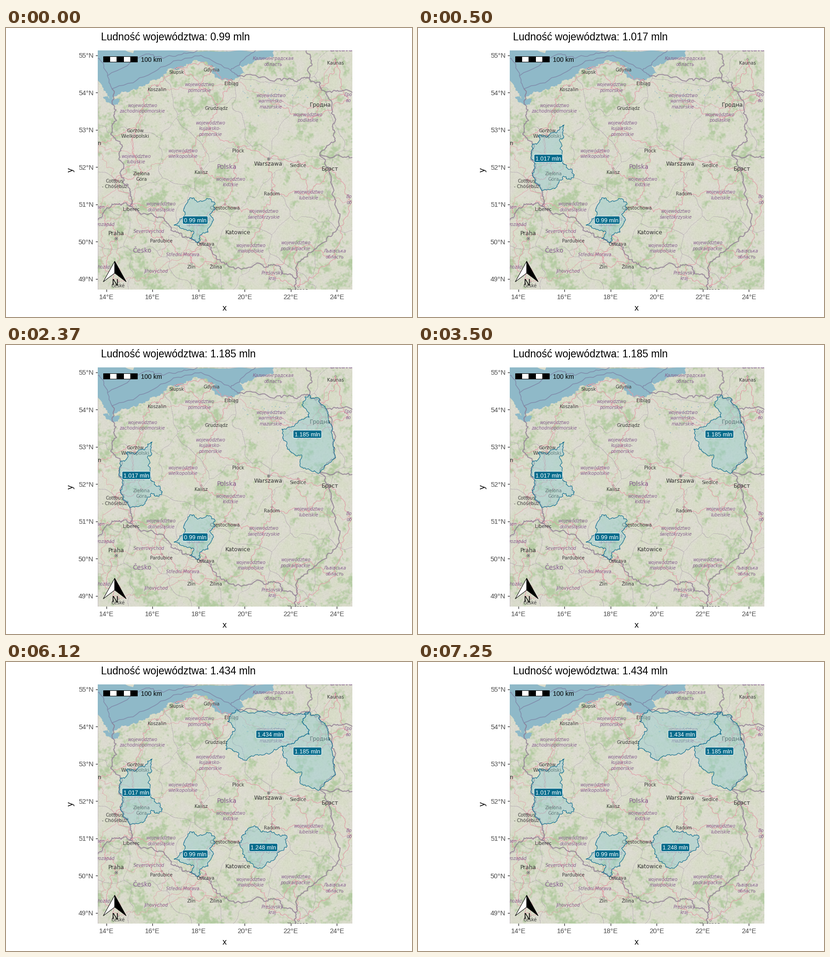
Write a matplotlib script that moves like this. It is 885x632 px and loops after 8000 ms.

```python
import numpy as np
import matplotlib.pyplot as plt
from matplotlib.animation import FuncAnimation
from matplotlib.collections import LineCollection
from matplotlib.patches import FancyBboxPatch, Polygon, Rectangle

W, H, DPI = 885, 632, 64
LEFT, RIGHT, TOP, BOTTOM = 200, 754.5, 49, 572
LOOP, STEP = 8000, 40
PT = 72 / DPI  # points per pixel
SEA_COLOR, PURPLE = "#8fb9c8", "#86608f"

fig = plt.figure(figsize=(W / DPI, H / DPI), dpi=DPI, facecolor="white")


def pixel_axes(x0, x1, y0, y1):
    ax = fig.add_axes([x0 / W, 1 - y1 / H, (x1 - x0) / W, (y1 - y0) / H])
    ax.set(xlim=(x0, x1), ylim=(y1, y0))
    ax.axis("off")
    return ax


page = pixel_axes(0, W, 0, H)
chart = pixel_axes(LEFT, RIGHT, TOP, BOTTOM)


def write(ax, x, y, text, size, color="black", font="Liberation Sans", **kw):
    return ax.text(x, y + 0.36 * size, text, size=size * PT, color=color,
                   family=font, va="baseline", clip_on=True, **kw)


def place(text, x, y, size=10, color="#3c3c3c", **kw):
    """Centre a map label of one or more lines on a point."""
    lines = text.split("\n")
    for i, line in enumerate(lines):
        write(chart, x, y + 12.6 * (i - (len(lines) - 1) / 2), line, size,
              color, "DejaVu Sans", ha="center", **kw)


def rough(points, depth=4, cap=3):
    """Jagged path; offsets depend on position, so shared borders agree."""
    p = np.array(points, float)
    for _ in range(depth):
        a, b = p[:-1], p[1:]
        mid = (a + b) / 2
        reach = np.minimum(np.hypot(*(b - a).T) * 0.26, cap)[:, None]
        key = mid @ np.array([12.9898, 78.233])
        mid += reach * np.c_[np.sin(key), np.cos(key * 1.7)]
        out = np.empty((len(a) + len(b) + 1, 2))
        out[::2], out[1::2] = p, mid
        p = out
    return p


def strokes(paths, color, width, **kw):
    chart.add_collection(LineCollection(paths, colors=color,
                                        linewidths=width * PT, **kw))


# Place names
TOWNS = [("Słupsk", 372, 96), ("Gdynia", 448, 91.5), ("Koszalin", 329, 134),
         ("Elbląg", 491, 121), ("Grudziądz", 459, 175), ("Płock", 506, 268),
         ("Gorzów\nWielkopolski", 282, 230.5), ("Siedlce", 636, 300),
         ("Kalisz", 425, 315), ("Zielona\nGóra", 295, 324.5),
         ("Cottbus\n- Chóśebuz", 237, 340.5), ("Radom", 579, 362.5),
         ("Liberec", 273, 396.5), ("Częstochowa", 477, 393.5),
         ("Pardubice", 339, 465), ("Ostrava", 435, 472.5),
         ("Zlín", 404, 522), ("Žilina", 458, 522), ("Kaunas", 718, 76.5),
         ("České", 244, 563), ("Ужгород", 637, 573)]
CITIES = [("Warszawa", 572, 297), ("Katowice", 505.5, 447),
          ("Praha", 240, 449), ("Гродна", 685, 168), ("Брэст", 706, 308),
          ("n", 204, 252)]
COUNTRIES = [("Polska", 481, 303.5), ("Česko", 297, 486),
             ("Lietuva", 731, 46)]
PROVINCES = [
    ("pomorskie", 421, 130), ("zachodniopomorskie", 297, 175.5),
    ("warmińsko-\nmazurskie", 577, 160), ("podlaskie", 658, 195.5),
    ("kujawsko-\npomorskie", 445, 220), ("wielkopolskie", 385, 274.5),
    ("lubuskie", 284, 286.5), ("łódzkie", 490, 336.5),
    ("dolnośląskie", 338, 391), ("opolskie", 413, 423.5),
    ("świętokrzyskie", 562, 407), ("lubelskie", 660, 365),
    ("małopolskie", 533, 481.5), ("podkarpackie", 631, 476)]
FOREIGN = [
    ("Калининградская\nобласть", 583, 73), ("Львівська\nобласть", 717, 494),
    ("Severovýchod", 312, 445), ("Střední Morava", 385, 496),
    ("Jihovýchod", 327, 531.5), ("Prešovský\nkraj", 581, 541.5),
    ("rozapád", 218, 430), ("hozáp", 214, 523), ("sen", 207, 392),
    ("Гро\nво", 746, 152), ("Во\nоб", 748, 375)]


def spots(places):
    return np.array([p[1:] for p in places])


# Terrain: woods from layered noise, borders halfway between province names
rng = np.random.default_rng(18)
gw, gh = 555, 523


def noise(scale):
    k2 = np.fft.fftfreq(gw) ** 2 + np.fft.fftfreq(gh)[:, None] ** 2
    spectrum = np.fft.fft2(rng.normal(size=(gh, gw)))
    n = np.fft.ifft2(spectrum * np.exp(-2 * (np.pi * scale) ** 2 * k2)).real
    return n / n.std()


def blend(a, b, share):
    return a * (1 - share[..., None]) + np.array(b) * share[..., None]


gx, gy = np.meshgrid(np.arange(gw) + LEFT, np.arange(gh) + TOP)
hills = np.clip((gy - 470) / 90, 0, 1)
trees = 0.45 * noise(1.6) + 0.55 * noise(5) + 0.45 * noise(16) + 0.5 * hills
land = blend(np.full((gh, gw, 3), (220.0, 219, 208)), (216, 220, 200),
             np.clip(0.5 + 0.35 * noise(5), 0, 1))
land = blend(land, (179, 203, 161), np.clip(0.6 * trees - 0.15, 0, 0.95))

wx, wy = gx + 5 * noise(9), gy + 5 * noise(9)
owner = np.argmin([np.hypot(wx - x, wy - y)
                   for x, y in spots(PROVINCES + FOREIGN)], axis=0)
edge = (owner != np.roll(owner, 1, 0)) | (owner != np.roll(owner, 1, 1))
land = blend(land, (165, 150, 168), 0.5 * edge)
land += 2 * noise(0.7)[..., None]
chart.imshow(np.clip(land, 0, 255).astype(np.uint8), aspect="auto",
             extent=(LEFT, RIGHT, BOTTOM, TOP), interpolation="nearest")

SEA = [(198, 47), (584, 47), (583, 62), (545, 71), (510, 82), (521, 99),
       (499, 111), (468, 113), (449, 99), (460, 88), (437, 74), (400, 78),
       (364, 89), (342, 106), (300, 126), (262, 139), (231, 153),
       (217, 138), (198, 112)]
LAGOON = [(212, 150), (250, 155), (237, 168), (217, 161), (212, 150)]
for water in (SEA, LAGOON):
    chart.add_patch(Polygon(rough(water), fc=SEA_COLOR, ec="none"))
chart.add_patch(Polygon([(256, 47), (280, 47), (277, 55), (266, 52)],
                        fc="#d9dccd", ec="none"))
lakes = rng.normal((583, 150), (38, 17), (45, 2))
chart.scatter(*lakes.T, s=rng.uniform(1, 7, 45), c=SEA_COLOR, lw=0)

# Roads join each place to its nearest neighbours
dots = spots(TOWNS) - (0, 8.5)
capitals = spots(CITIES)[[0, 2]] + (0, -11), spots(CITIES)[[0, 2]] + (0, 11)
waw, praha = capitals[0][0], capitals[1][1]
hubs = np.vstack([dots, spots(CITIES[3:]), spots(PROVINCES), spots(FOREIGN[1:]),
                  waw, praha])
roads = [rough([hub, hubs[j]], 5, 7) for hub in hubs
         for j in np.argsort(np.hypot(*(hubs - hub).T))[1:4]]
strokes(roads, "#e29aa6", 1, alpha=0.7)

# Highlighted provinces, as key points of their outlines
SHARED = [(661, 109), (647, 124), (661, 149), (661, 158), (635, 171),
          (601, 184)]
OPOLSKIE = [(400, 372), (414, 377), (437, 373), (455, 382), (451, 400),
            (444, 407), (452, 421), (441, 446), (427, 452), (418, 470),
            (401, 461), (407, 444), (380, 437), (366, 431), (390, 405),
            (389, 394)]
LUBUSKIE = [(319, 212), (318, 237), (309, 243), (316, 292), (326, 307),
            (341, 321), (333, 331), (317, 324), (303, 345), (270, 356),
            (255, 338), (249, 318), (255, 296), (247, 276), (250, 254),
            (262, 250), (262, 236), (290, 230)]
PODLASKIE = SHARED[::-1] + [
    (684, 118), (698, 140), (716, 208), (718, 247), (684, 279), (665, 275),
    (643, 267), (645, 244), (625, 236), (612, 222), (604, 204)]
SWIETOKRZYSKIE = [(543, 359), (557, 372), (577, 369), (598, 381), (612, 380),
                  (613, 402), (583, 434), (553, 450), (540, 449), (518, 427),
                  (509, 400), (513, 384), (527, 366)]
WARMINSKIE = SHARED + [
    (556, 203), (512, 211), (507, 199), (481, 192), (481, 178), (499, 150),
    (483, 130), (487, 121), (504, 105), (600, 115), (640, 114)]

# start ms, outline, population, label centre
REGIONS = [(0, OPOLSKIE, "0.99", 412.5, 420),
           (500, LUBUSKIE, "1.017", 284, 285),
           (2370, PODLASKIE, "1.185", 657, 195),
           (4250, SWIETOKRZYSKIE, "1.248", 561, 405.5),
           (6120, WARMINSKIE, "1.434", 576, 158)]

# Frontiers, on land and at sea
FRONTIERS = [
    [(231, 133), (241, 202), (228, 232)] + LUBUSKIE[14:8:-1]
    + [(273, 372), (270, 390)],
    [(198, 425), (215, 400), (240, 385), (270, 390), (346, 420), (372, 447),
     (402, 460), (418, 470), (443, 477), (470, 513), (490, 523), (558, 518),
     (590, 520), (630, 548)],
    [(630, 574), (630, 548), (633, 528), (690, 470), (726, 428), (703, 312)]
    + PODLASKIE[10:5:-1] + [SHARED[0]],
    WARMINSKIE[-3:] + [SHARED[0], (658, 90), (666, 72), (655, 47)],
    [(684, 279), (756, 283)],
    [(698, 140), (756, 142)]]
MARITIME = [
    [(198, 62), (215, 90), (231, 133), (300, 107), (365, 72), (425, 60),
     (490, 93), (504, 105)],
    [(490, 93), (510, 76), (546, 47)],
    [(222, 104), (305, 57), (340, 66), (385, 57), (425, 47)]]
strokes([rough(p, 4, 4) for p in FRONTIERS], "#8b7790", 2.1, alpha=0.75)
strokes([rough(p, 3, 2) for p in MARITIME], "#7c7fa3", 1.6, alpha=0.75)

# Towns and labels
chart.scatter(*dots.T, s=17, fc="#e8e6e0", ec="#666666", lw=0.9)
for capital in (waw, praha):
    chart.scatter(*capital, s=42, fc="#e8e6e0", ec="#555555", lw=1, zorder=3)
    chart.scatter(*capital, s=10, c="#444444", lw=0, zorder=3)
for name, x, y in PROVINCES:
    place("województwo\n" + name, x, y, 9.6, PURPLE, style="italic")
for name, x, y in FOREIGN:
    place(name, x, y, 9.5, PURPLE, style="italic")
for name, x, y in COUNTRIES:
    place(name, x, y, 13.6, PURPLE)
for name, x, y in TOWNS:
    place(name, x, y)
for name, x, y in CITIES:
    place(name, x, y, 12.3, "#333333")

# Scale bar and north arrow
for i in range(5):
    chart.add_patch(Rectangle((211.5 + 14.9 * i, 62), 14.9, 12, ec="black",
                              fc="white" if i % 2 else "black", lw=PT,
                              zorder=4))
write(chart, 293.5, 69, "100 km", 14, zorder=4)
for side, fill in ((-25, "white"), (25, "black")):
    chart.add_patch(Polygon([(237, 510), (237 + side, 555), (237, 536)],
                            fc=fill, ec="black", lw=PT, zorder=4))
write(chart, 237, 555.5, "N", 19.5, ha="center", zorder=4)

# Axes
for i in range(6):
    x = 219 + 100.45 * i
    page.plot([x, x], [572, 576], color="#333333", lw=1.4 * PT)
    write(page, x, 587.5, f"{14 + 2 * i}°E", 14.7, "#4d4d4d", ha="center")
for i in range(7):
    y = 59.5 + 81.5 * i
    page.plot([196, 200], [y, y], color="#333333", lw=1.4 * PT)
    write(page, 191, y + 0.5, f"{55 - i}°N", 14.7, "#4d4d4d", ha="right")
write(page, 476.5, 611, "x", 18.3, ha="center")
page.text(141.5, 310.5, "y", size=18.3 * PT, family="Liberation Sans",
          rotation=90, ha="center", va="center")
title = write(page, 207, 19, "", 22.5)

# Highlights
layers = []
for start, outline, count, x, y in REGIONS:
    shape = chart.add_patch(Polygon(
        rough(outline + outline[:1]), fc=(0.58, 0.80, 0.82, 0.46),
        ec="#0b6a8e", lw=1.1 * PT, zorder=5))
    width = 27 + 7 * len(count)
    tag = chart.add_patch(FancyBboxPatch(
        (x - width / 2, y - 8.7), width, 17.4, fc="#036b8b", ec="white",
        lw=PT, zorder=6, boxstyle="round,pad=0,rounding_size=2.5"))
    text = write(chart, x, y + 0.3, f"{count} mln", 12.7, "white",
                 ha="center", zorder=7)
    layers.append((start, count, (shape, tag, text)))


def update(frame):
    now = (frame + 1) * STEP - 1
    for start, count, artists in layers:
        shown = start <= now
        for artist in artists:
            artist.set_visible(shown)
        if shown:
            title.set_text(f"Ludność województwa: {count} mln")
    return [title]


anim = FuncAnimation(fig, update, frames=LOOP // STEP, interval=STEP,
                     repeat=True, repeat_delay=0, blit=False)
plt.show()
```
